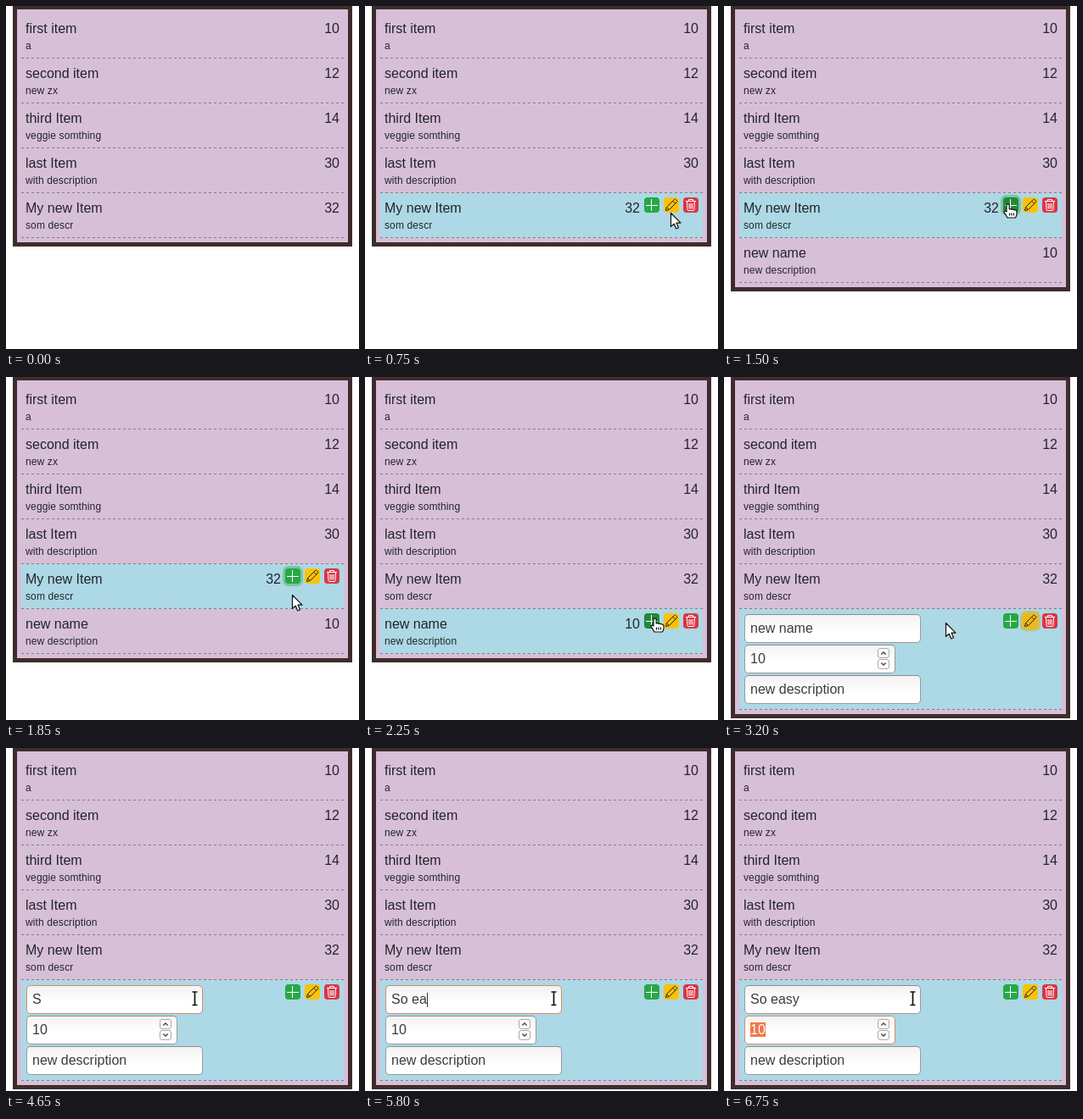
Write an HTML page that moves like this. It is 416 px wide and 405 px high and loops after 8000 ms.

```html
<!DOCTYPE html>
<html lang="en">
<head>
<meta charset="utf-8">
<title>Editable list</title>
<style>
html, body { margin: 0; width: 100%; height: 100%; overflow: hidden; background: #fff; }
body { position: relative; font: 16px/24px "Liberation Sans", Arial, sans-serif; color: #212529; }
#list { position: absolute; left: 8px; top: -1px; width: 400px; box-sizing: border-box;
  padding: 5px; border: 5px solid #3e2c2c; background: #d8bfd8; }
.row { --dash: calc(380px / 127); position: relative; height: 53px; box-sizing: border-box; padding: 5px;
  background: repeating-linear-gradient(90deg, #808080 0 var(--dash), transparent var(--dash) calc(2 * var(--dash))) 0 100% / 100% 1px no-repeat; }
.row.on { background-color: #add8e6; }
.row.edit { height: 119px; }
.row.edit > :not(#form) { display: none; }
.name { position: relative; top: 1px; }
.price { position: absolute; right: 5px; top: 6px; }
.on .price { right: 74px; }
.desc { font-size: 12px; line-height: 18px; letter-spacing: .12px; }
#tools { position: absolute; left: 329px; }
#tools svg { position: absolute; width: 18px; height: 18px; border-radius: 4px; fill: none; }
#form { display: none; }
.edit #form { display: block; }
.field { position: absolute; left: 6px; width: 208px; height: 34px; box-sizing: border-box; padding-left: 6px;
  border: 1px solid #9a9c9e; border-top-color: #8c8e90; border-radius: 5px; color: #3c3c3c;
  background: linear-gradient(#f2f2f2, #fff 60%); line-height: 32px; white-space: pre; }
.field.focus { border-color: #d98c66; }
.sel { background: #f07746; color: #fff; }
.caret { display: inline-block; width: 1px; height: 17px; margin-right: -1px; vertical-align: -4px; background: #333; }
.field svg { position: absolute; left: 156px; top: 3px; }
#cursor { position: absolute; left: 0; top: 0; overflow: visible; width: 1px; height: 1px; }
</style>
</head>
<body>
<div id="list"></div>
<div id="tools">
  <svg viewBox="0 0 18 18" stroke="#fff"><path d="M2 9.5H16M8.5 2V16"/></svg>
  <svg viewBox="0 0 18 18" stroke="#212529" style="left:23px"><path d="M2.5 15.5l1-4 9-9q.8-.7 1.5 0l1.5 1.5q.7.8 0 1.5l-9 9zM10.7 4.3l3 3M3.5 11.5l3 3"/></svg>
  <svg viewBox="0 0 18 18" stroke="#fff" style="left:46px"><path d="M3 4.5H15M6.5 4V2.5h5V4M4.5 5l.6 9.5q.1 1 1 1h5.8q.9 0 1-1L13.5 5M7 7l.3 6.5M9 7v6.5M11 7l-.3 6.5"/></svg>
</div>
<svg id="cursor" stroke-linejoin="round">
  <path fill="#fff" stroke="#111" stroke-width="1.2" d="M0 0V16l3.7-3.4 2.5 5.9 2.8-1.2-2.5-5.7h5z"/>
  <path fill="#fff" stroke="#111" stroke-width="1.2" d="M-1.5 9.5V2a1.6 1.6 0 0 1 3.2 0V6.5q1.5-1 3 .3q1.8-.7 3 .6q2-.3 2.8 1.2V12q0 2-1.5 4.5H-.5Q-2 13-4.5 10.5q-.3-2 1.2-1.8zM2 11v3M4.5 11v3M7 11v3"/>
  <g fill="none"><path stroke="#fff" stroke-width="4" d="M-3-7.5H3M0-7.5V8M-3 8H3"/>
  <path stroke="#111" stroke-width="1.7" d="M-3-7.5H3M0-7.5V8M-3 8H3"/></g>
</svg>
<script>
const $ = id => document.getElementById(id);
const items = [['first item', 10, 'a'], ['second item', 12, 'new zx'], ['third Item', 14, 'veggie somthing'],
  ['last Item', 30, 'with description'], ['My new Item', 32, 'som descr'], ['new name', 10, 'new description']];
$('list').innerHTML = items.map(([name, price, desc]) =>
  `<div class="row"><div class="name">${name}</div><div class="price">${price}</div><div class="desc">${desc}</div></div>`).join('');

const rows = [...document.querySelectorAll('.row')], last = rows[5];
last.insertAdjacentHTML('beforeend', `<div id="form">
  <div class="field" style="top:6px"><span></span><i></i></div>
  <div class="field" style="top:42px;width:178px"><span>10</span>
    <svg width="16" height="26" fill="#fafafa" stroke="#aaa"><rect x=".5" y=".5" width="13" height="11" rx="2.5"/><rect x=".5" y="13.5" width="13" height="11" rx="2.5"/><path fill="none" stroke="#444" stroke-width="1.3" d="M4.3 7.5L7 5l2.7 2.5M4.3 17.5L7 20l2.7-2.5"/></svg></div>
  <div class="field" style="top:78px">new description</div></div>`);

const fields = [...document.querySelectorAll('.field')];
const [nameText, caret] = fields[0].children, priceText = fields[1].children[0];
const buttons = [...$('tools').children], shapes = [...$('cursor').children];
const colors = ['#28a745', '#ffc107', '#dc3545'], hovers = ['#218838', '#e0a800', '#c82333'];
const rings = ['rgba(72,180,97,.5)', 'rgba(222,170,12,.5)'];

const LOOP = 8000, ADD = 1500, EDIT = 2800, FOCUS = 3600, SELECT = 3700, TAB = 6750;
const path = [[450, 408, 249], [750, 360, 244], [1050, 334, 233], [1500, 334, 233], [2250, 341, 284],
  [2600, 359, 287], [2850, 359, 288], [3200, 261, 290], [3700, 222, 295]];
const keys = [4650, 4950, 5250, 5600, 5800, 6400, 6600];

function pointAt(t) {
  const i = path.findIndex(p => p[0] > t);
  if (i < 0) return path[path.length - 1].slice(1);
  if (!i) return path[0].slice(1);
  const [a, b] = [path[i - 1], path[i]], k = (t - a[0]) / (b[0] - a[0]);
  return [1, 2].map(j => a[j] + (b[j] - a[j]) * k);
}

function draw(t) {
  const [x, y] = pointAt(t), moved = t >= 450, edit = t >= EDIT;
  const hover = moved && x < 398 ? Math.min(5, Math.floor((y - 9) / 53)) : -1;
  rows.forEach((r, i) => r.classList.toggle('on', i === hover));
  last.style.display = t < ADD ? 'none' : '';
  last.classList.toggle('edit', edit);

  const top = 14 + hover * 53;
  $('tools').style.display = hover < 0 ? 'none' : '';
  $('tools').style.top = top + 'px';
  // Index of the button that kept focus after its click
  const focused = edit ? (t < FOCUS ? 1 : -1) : t >= ADD && hover === 4 ? 0 : -1;
  let over = false;
  buttons.forEach((b, i) => {
    const dx = x - 329 - i * 23, hit = dx >= 0 && dx < 18 && y >= top && y < top + 18;
    over ||= hit;
    b.style.background = hit ? hovers[i] : i === 1 && focused === 1 ? '#efb814' : colors[i];
    b.style.boxShadow = i === focused ? '0 0 0 3px ' + rings[i] : 'none';
  });

  const typed = keys.filter(k => t >= k).length;
  nameText.textContent = typed ? 'So easy'.slice(0, typed) : 'new name';
  nameText.className = t >= SELECT && !typed ? 'sel' : '';
  caret.className = typed > 1 && t < TAB ? 'caret' : '';
  priceText.className = t >= TAB ? 'sel' : '';
  fields[0].classList.toggle('focus', t >= FOCUS && t < TAB);
  fields[1].classList.toggle('focus', t >= TAB);

  const shape = edit && x < 232 ? 2 : over ? 1 : 0;
  shapes.forEach((s, i) => s.style.display = moved && i === shape ? '' : 'none');
  $('cursor').style.transform = `translate(${Math.round(x) + .5}px, ${Math.round(y) + .5}px)`;
}

const start = performance.now();
function tick() {
  const t = (performance.now() - start) % LOOP;
  draw(Math.floor(t / 50) * 50);
  requestAnimationFrame(tick);
}
tick();
</script>
</body>
</html>
```
